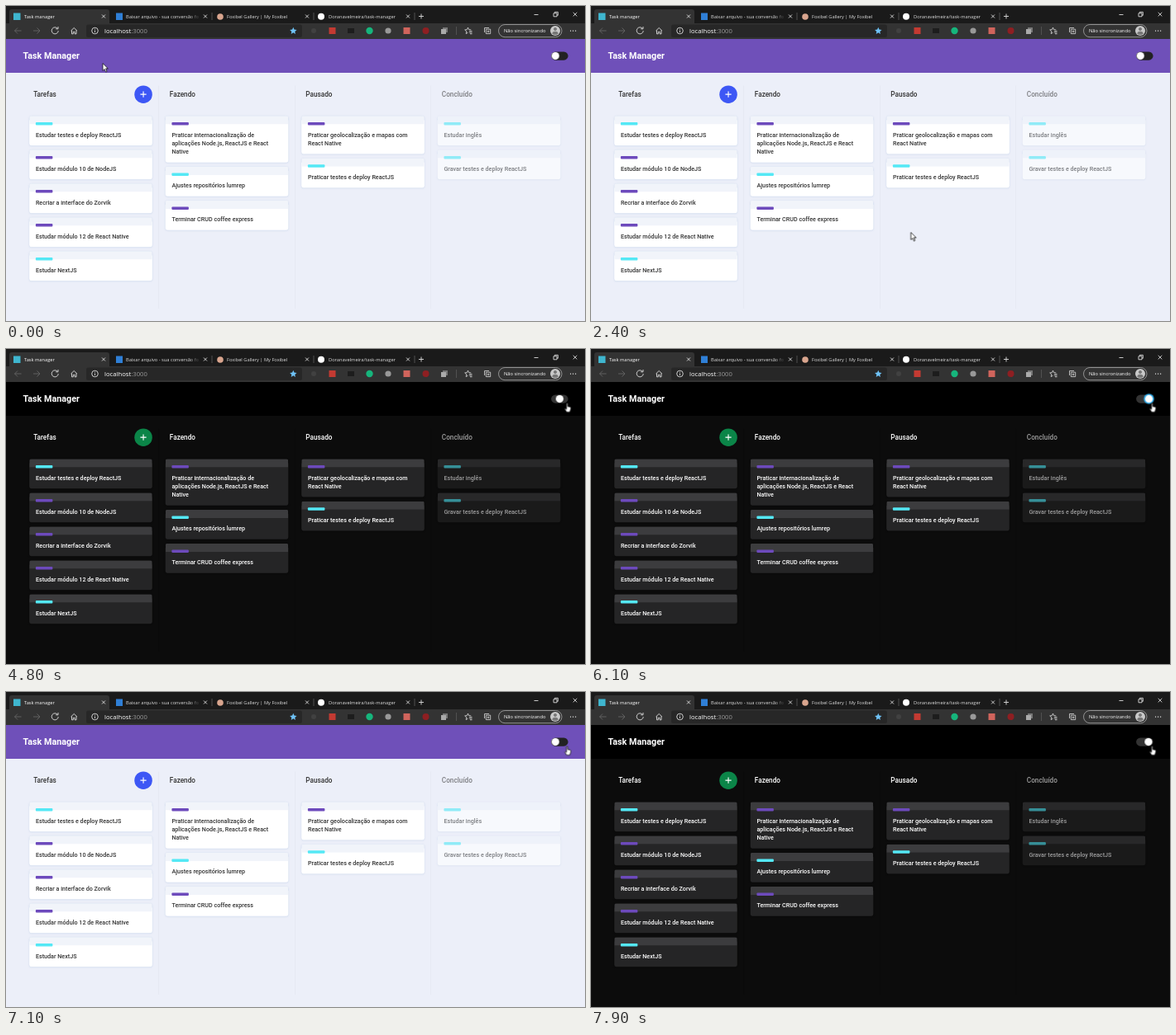
An HTML page for the animation above (8000 ms loop, 700x382 px).

```html
<!DOCTYPE html>
<html lang="pt-BR">
<head>
<meta charset="utf-8">
<title>Task manager</title>
<style>
  html, body { margin: 0; width: 100%; height: 100%; overflow: hidden; }
  .stage { position: relative; width: 700px; height: 382px; overflow: hidden; background: var(--page); animation: theme 8s step-end infinite; }
  .browser { position: absolute; left: 0; top: 0; font: 5.7px "Open Sans", sans-serif; }

  /* The page is laid out at 1366px and scaled down */
  .app { position: absolute; left: 0; top: 40px; width: 1366px; height: 668px; transform: scale(.5125); transform-origin: 0 0; font: 500 14px/20px Roboto, sans-serif; color: var(--ink); }
  .bar { display: flex; align-items: center; justify-content: space-between; height: 80px; padding: 0 40px; background: var(--bar); color: #fff; }
  h1 { margin: 0; font-size: 21px; font-weight: 700; }
  .switch { position: relative; width: 40px; height: 20px; border-radius: 10px; background: var(--track); }
  .knob { position: absolute; left: 1px; top: 1px; width: 18px; height: 18px; border-radius: 50%; background: #fff; animation: knob 8s step-end infinite, press 8s step-end infinite; }

  .board { display: flex; padding: 30px 40px; }
  .col { flex: 0 0 290px; height: 528px; padding: 0 15px; }
  .col + .col { border-left: 1px solid var(--line); }
  .done > * { opacity: .6; }
  .head { display: flex; align-items: center; justify-content: space-between; height: 42px; padding-left: 10px; }
  h2 { margin: 0; font-size: 16px; font-weight: 500; }
  .add { width: 42px; height: 42px; border-radius: 50%; background: var(--add); }
  .add path { stroke: #fff; stroke-width: 2.2; }
  ul { margin: 30px 0 0; padding: 0; list-style: none; }
  li { position: relative; margin-bottom: 10px; padding: 15px; border-top: 20px solid var(--strip); border-radius: 5px; background: var(--card); box-shadow: 0 1px 4px var(--shadow); white-space: nowrap; }
  li::before { content: ""; position: absolute; left: 15px; top: -5px; width: 40px; height: 7px; border-radius: 2px; background: #6d4abc; }
  li.cyan::before { background: #54e8f5; }

  .cursor { position: absolute; left: 0; top: 0; animation: move 8s infinite; }
  .cursor path { fill: #fff; stroke: #111; stroke-width: .8; stroke-linejoin: round; }
  .arrow { animation: arrow 8s step-end infinite; }
  .hand { animation: hand 8s step-end infinite; }

  @keyframes theme {
    0%, 77.5% {
      --page: #eceff9; --bar: #6f50b9; --track: #222; --ink: #333; --card: #fff; --strip: #f1f4fa;
      --add: #3d57f5; --line: rgba(0,0,0,.05); --shadow: rgba(192,208,230,.8);
    }
    60%, 97.5%, 100% {
      --page: #0c0c0c; --bar: #000; --track: #333; --ink: #fff; --card: #252526; --strip: #3c3c3e;
      --add: #0b8548; --line: rgba(0,0,0,.3); --shadow: rgba(0,0,0,.5);
    }
  }
  @keyframes knob {
    0%, 78.75% { transform: none; }
    60%, 77.5%, 97.5% { transform: translateX(10px); }
    61.25% { transform: translateX(20px); }
    98.75%, 100% { transform: translateX(19px); }
  }
  @keyframes press {
    0%, 77.5%, 100% { box-shadow: none; }
    76.25% { box-shadow: 0 0 2px 3px #3bf; }
  }
  /* Pointer positions advance every 100ms */
  @keyframes move {
    0% { transform: translate(117px, 69.5px); animation-timing-function: steps(4); }
    5% { transform: translate(160px, 150px); animation-timing-function: steps(5); }
    11.25%, 12.5% { transform: translate(300px, 255px); animation-timing-function: steps(5); }
    18.75% { transform: translate(425px, 215px); animation-timing-function: steps(4); }
    23.75% { transform: translate(388px, 271px); animation-timing-function: step-end; }
    30%, 33.75% { transform: translate(386.7px, 274.5px); animation-timing-function: steps(5); }
    40% { transform: translate(560px, 175px); animation-timing-function: steps(4); }
    45% { transform: translate(688px, 67px); animation-timing-function: steps(5); }
    51.25%, 100% { transform: translate(678.4px, 65.5px); }
  }
  @keyframes arrow { 0% { opacity: 1; } 50%, 100% { opacity: 0; } }
  @keyframes hand { 0% { opacity: 0; } 50%, 100% { opacity: 1; } }
</style>
</head>
<body>
<div class="stage">
  <svg class="browser" width="700" height="40" fill="none" stroke-width=".9">
    <path fill="#1a1a1a" d="M0 0h700v40H0z"/>
    <path fill="#333" d="M0 21h700v19H0zM4 21V7q0-3 3-3h115q3 0 3 3v14z"/>
    <rect x="97" y="22.5" width="261" height="15.5" rx="2.5" fill="#272727"/>
    <path stroke="#555" d="M249 8v9M372 8v9M494 8v9M544.5 25v10"/>

    <rect x="9" y="8.5" width="8.5" height="8.5" fill="#3fb6cf"/>
    <rect x="133" y="8.5" width="8" height="8.5" fill="#2f7fd6"/>
    <circle cx="259" cy="13" r="3.8" fill="#d9a58e"/>
    <circle cx="381" cy="12.8" r="4" fill="#fff"/>

    <defs>
      <linearGradient id="fade" gradientUnits="userSpaceOnUse" x1="222" x2="235">
        <stop stop-color="#ddd"/><stop offset="1" stop-color="#ddd" stop-opacity="0"/>
      </linearGradient>
      <path id="x" d="M-2-2l4 4m0-4l-4 4"/>
    </defs>
    <g fill="#ddd">
      <text x="22" y="14.8" fill="#fff">Task manager</text>
      <text x="145" y="14.8" fill="url(#fade)">Baixar arquivo - sua conversão fo</text>
      <text x="267" y="14.8">Foxibel Gallery | My Foxibel</text>
      <text x="390" y="14.8">Doranavelmeira/task-manager</text>
      <text x="119" y="32.8" font-size="7.7" fill="#fff">localhost<tspan fill="#999">:3000</tspan></text>
      <text x="602" y="32.2" font-size="5.8" fill="#fff">Não sincronizando</text>
    </g>
    <g stroke="#ddd">
      <use href="#x" x="118" y="12.5"/><use href="#x" x="241" y="12.5"/>
      <use href="#x" x="364" y="12.5"/><use href="#x" x="486" y="12.5"/>
      <path d="M499 12.5h6M502 9.5v6M638.5 10.5h5M662 8.8h4v4h-4zM663.3 8.5V7.3h4v4h-1.2M685.7 7.8l4.6 4.6m0-4.6l-4.6 4.6"/>
    </g>

    <path stroke="#666" d="M18.5 30h-8m3.5-3.5L10.5 30l3.5 3.5M33 30h8m-3.5-3.5L41 30l-3.5 3.5"/>
    <g stroke="#ddd">
      <path d="M62.3 27.3a4 4 0 1 0 .9 2.7M63 25v2.8h-2.8M78.5 30l3.7-3.5 3.7 3.5M79.5 29.5v4.3h1.8v-2.5h1.8v2.5H85v-4.3"/>
      <circle cx="107.5" cy="30" r="3.8"/><path d="M107.5 29.5v2.5M107.5 27.7v.9"/>
    </g>
    <path id="star" fill="#6fc3f7" d="M347.3 25.8l1.2 2.8 3 .3-2.2 2 .6 3-2.6-1.6-2.6 1.6.6-3-2.2-2 3-.3z"/>

    <circle cx="372" cy="30" r="3" fill="#414141"/>
    <rect x="390.5" y="26" width="8" height="8" fill="#c33a32"/>
    <rect x="413" y="27" width="8" height="6" fill="#1d1d1d"/>
    <circle cx="439.5" cy="30" r="4.2" fill="#16b57c"/>
    <circle cx="462" cy="30" r="3.6" fill="#999"/>
    <rect x="480.5" y="26" width="8" height="8" fill="#d0645c"/>
    <circle cx="507.5" cy="30" r="4" fill="#8e1f22"/>
    <path fill="#777" d="M528 26h6v6h-6z"/><path fill="#aaa" d="M526 28h6v6h-6z"/>
    <g stroke="#ddd" stroke-width=".8">
      <path d="M558.5 26l1 2.6 2.8.2M558.5 26l-1.1 2.6-2.7.3 2.1 1.9-.6 2.8 2.3-1.4M560 30.5h3.5M560 32.2h3.5M561 33.8h2.5"/>
      <path d="M578.5 32v-5.5h5.5M580.3 28.2h5.4v5.4h-5.4zM583 29.5v2.8M581.6 30.9h2.8"/>
    </g>
    <rect x="595.5" y="22.5" width="76.5" height="15.2" rx="7.6" stroke="#bbb" stroke-width=".7"/>
    <circle cx="664" cy="30" r="6" fill="#c9c9c9"/>
    <path fill="#777" d="M664 26a2 2 0 1 1-.01 0zM660.3 33.8q0-3 3.7-3t3.7 3q-3.7 2.6-7.4 0z"/>
    <path fill="#ddd" d="M682 29.5h1.2v1.2H682zM685 29.5h1.2v1.2H685zM688 29.5h1.2v1.2H688z"/>
  </svg>

  <main class="app">
    <div class="bar">
      <h1>Task Manager</h1>
      <div class="switch"><div class="knob"></div></div>
    </div>
    <div class="board">
      <section class="col">
        <div class="head">
          <h2>Tarefas</h2>
          <svg class="add" viewBox="0 0 42 42"><path d="M14 21h14M21 14v14"/></svg>
        </div>
        <ul>
          <li class="cyan">Estudar testes e deploy ReactJS</li>
          <li>Estudar módulo 10 de NodeJS</li>
          <li>Recriar a interface do Zorvik</li>
          <li>Estudar módulo 12 de React Native</li>
          <li class="cyan">Estudar NextJS</li>
        </ul>
      </section>
      <section class="col">
        <div class="head"><h2>Fazendo</h2></div>
        <ul>
          <li>Praticar internacionalização de<br>aplicações Node.js, ReactJS e React<br>Native</li>
          <li class="cyan">Ajustes repositórios lumrep</li>
          <li>Terminar CRUD coffee express</li>
        </ul>
      </section>
      <section class="col">
        <div class="head"><h2>Pausado</h2></div>
        <ul>
          <li>Praticar geolocalização e mapas com<br>React Native</li>
          <li class="cyan">Praticar testes e deploy ReactJS</li>
        </ul>
      </section>
      <section class="col done">
        <div class="head"><h2>Concluído</h2></div>
        <ul>
          <li class="cyan">Estudar inglês</li>
          <li class="cyan">Gravar testes e deploy ReactJS</li>
        </ul>
      </section>
    </div>
  </main>

  <svg class="cursor" width="12" height="14" overflow="visible">
    <path class="arrow" d="M0 0v9l2.1-1.9 1.5 3.4 1.5-.7-1.5-3.3h2.8z"/>
    <path class="hand" d="M-.8.8q.8-1.4 1.6 0v3.4l3 .7q.8.3.7 1.2L4 8.8l-.9 2.2H-.6L-2.8 7.4q.1-1.3 2 .1z"/>
  </svg>
</div>
</body>
</html>
```
